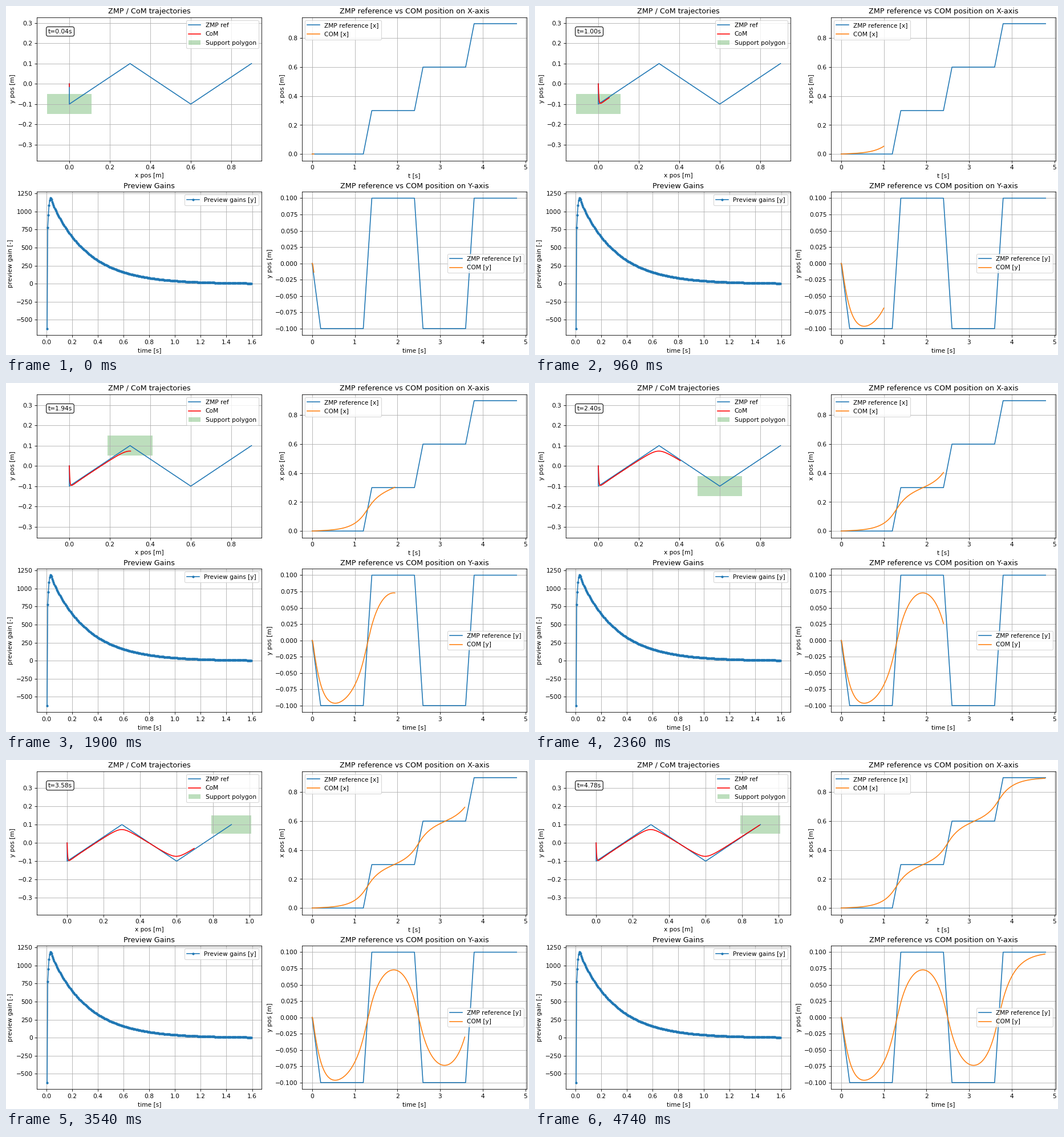
A matplotlib script that plays this animation: 917x611 px, repeating every 4.76 s.

```python
import numpy as np
import matplotlib.pyplot as plt
from matplotlib.animation import FuncAnimation
from matplotlib.patches import Rectangle

W, H, DPI = 917, 611, 76.4
FRAMES, INTERVAL = 238, 20

DT = 0.005
STEPS = 960
PREVIEW = 319
COM_HEIGHT, GRAVITY = 0.8, 9.81

STEP_TIME, STEP_LEN, FOOT_Y = 1.2, 0.3, 0.1
FOOT_W, FOOT_H = 0.22, 0.1

plt.rcParams.update({"font.family": "DejaVu Sans", "font.size": 10})


# ---- walking pattern: preview control of the ZMP ----

def zmp_reference(t):
    knots = [0, 0.2, 1.2, 1.4, 2.4, 2.6, 3.6, 3.8, 4.8]
    x = np.interp(t, knots, [0, 0, 0, 0.3, 0.3, 0.6, 0.6, 0.9, 0.9])
    y = np.interp(t, knots, [0, -0.1, -0.1, 0.1, 0.1, -0.1, -0.1, 0.1, 0.1])
    return x, y


A = np.array([[1, DT, DT**2 / 2], [0, 1, DT], [0, 0, 1]])
B = np.array([DT**3 / 6, DT**2 / 2, DT])
C = np.array([1, 0, -COM_HEIGHT / GRAVITY])


def design(q=1.0, r=1e-6):
    """Return the integral, state and preview gains."""
    a = np.eye(4)
    a[0, 1:] = C @ A
    a[1:, 1:] = A
    b = np.concatenate(([C @ B], B))
    cost = np.diag([q, 0, 0, 0])
    p = cost.copy()
    for _ in range(3000):
        k = (b @ p @ a) / (r + b @ p @ b)
        p = cost + a.T @ p @ (a - np.outer(b, k))
    scale = 1 / (r + b @ p @ b)
    k = scale * (b @ p @ a)
    closed = (a - np.outer(b, k)).T
    preview = np.empty(PREVIEW)
    preview[0] = -k[0]
    v = p[:, 0]
    for i in range(1, PREVIEW):
        v = closed @ v
        preview[i] = scale * (b @ v)
    return k[0], k[1:], preview


def simulate(ref, gi, gx, preview):
    state, total = np.zeros(3), 0.0
    com = np.empty(STEPS)
    for k in range(STEPS):
        com[k] = state[0]
        total += C @ state - ref[k]
        u = -gi * total - gx @ state + preview @ ref[k + 1:k + 1 + PREVIEW]
        state = A @ state + B * u
    return com


time = np.arange(STEPS + PREVIEW + 1) * DT
ref_x, ref_y = zmp_reference(time)
gi, gx, gains = design()
com_x = simulate(ref_x, gi, gx, gains)
com_y = simulate(ref_y, gi, gx, gains)
time, ref_x, ref_y = time[:STEPS], ref_x[:STEPS], ref_y[:STEPS]


# ---- figure ----

fig, ((ax_path, ax_x), (ax_gain, ax_y)) = plt.subplots(
    2, 2, figsize=((W + 0.01) / DPI, (H + 0.01) / DPI), dpi=DPI,
    facecolor="white", layout="constrained")


def label(ax, title, xlabel, ylabel):
    ax.set(title=title, xlabel=xlabel, ylabel=ylabel)
    ax.grid(True)


label(ax_path, "ZMP / CoM trajectories", "x pos [m]", "y pos [m]")
label(ax_x, "ZMP reference vs COM position on X-axis", "t [s]", "x pos [m]")
label(ax_gain, "Preview Gains", "time [s]", "preview gain [-]")
label(ax_y, "ZMP reference vs COM position on Y-axis", "time [s]", "y pos [m]")

ax_path.plot(ref_x, ref_y, label="ZMP ref")
path_line, = ax_path.plot([], [], color="red", label="CoM")
foot_patch = Rectangle((0, 0), FOOT_W, FOOT_H, facecolor="green", alpha=0.26,
                       linewidth=0, label="Support polygon")
ax_path.add_patch(foot_patch)
clock = ax_path.text(0.05, 0.9, "", transform=ax_path.transAxes, va="center",
                     bbox=dict(boxstyle="round", facecolor="white"))
ax_path.legend(loc="upper right")

ax_gain.plot(DT * np.arange(1, PREVIEW + 1), gains, marker=".",
             label="Preview gains [y]")
ax_gain.legend(loc="upper right")


def tracking(ax, ref, name, loc):
    ax.plot(time, ref, label=f"ZMP reference [{name}]")
    ax.set(xlim=ax.get_xlim(), ylim=ax.get_ylim())
    line, = ax.plot([], [], label=f"COM [{name}]")
    ax.legend(loc=loc)
    return line


x_line = tracking(ax_x, ref_x, "x", "upper left")
y_line = tracking(ax_y, ref_y, "y", "center right")


def frame_path(foot):
    """Fit the path panel around all footholds so far, with equal scales."""
    lo, hi = -FOOT_W / 2, max(0.9, STEP_LEN * foot + FOOT_W / 2)
    pad = 0.05 * (hi - lo)
    ax_path.set_xlim(lo - pad, hi + pad)
    half = (hi - lo + 2 * pad) / 2 * ax_path.bbox.height / ax_path.bbox.width
    mid = -0.025 if foot == 0 else 0.0
    ax_path.set_ylim(mid - half, mid + half)


def update(i):
    k = 8 + 4 * i
    t = k * DT
    foot = min(3, int((t + 0.1) / STEP_TIME + 1e-9))
    side = -FOOT_Y if foot % 2 == 0 else FOOT_Y
    foot_patch.set_xy((STEP_LEN * foot - FOOT_W / 2, side - FOOT_H / 2))
    frame_path(foot)

    now = slice(0, k + 1)
    path_line.set_data(com_x[now], com_y[now])
    x_line.set_data(time[now], com_x[now])
    y_line.set_data(time[now], com_y[now])
    clock.set_text(f"t={t:.2f}s")
    return path_line, x_line, y_line, foot_patch, clock


# settle the layout once, then keep it fixed
for _ in range(3):
    update(0)
    fig.draw_without_rendering()
fig.set_layout_engine("none")

anim = FuncAnimation(fig, update, frames=FRAMES, interval=INTERVAL,
                     repeat=True, repeat_delay=0, blit=False)
plt.show()
```
